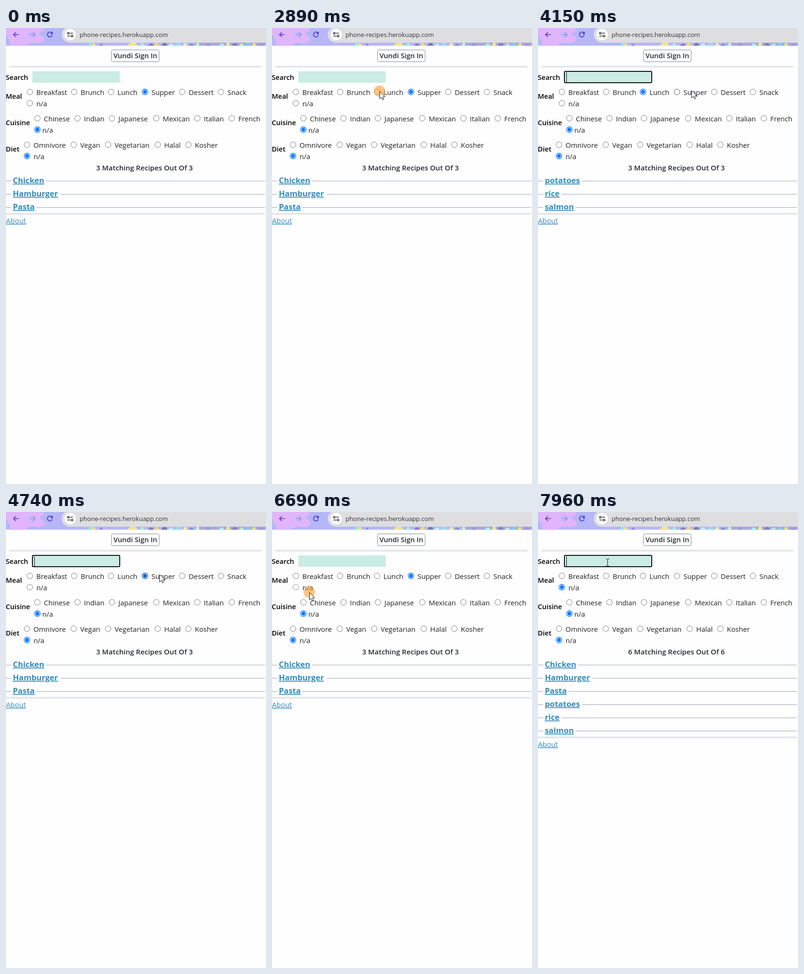
These frames come from a looping animation (551x967 px, 8000 ms). An HTML page:

```html
<!DOCTYPE html>
<html lang="en">
<head>
<meta charset="utf-8">
<title>Recipes</title>
<style>
  html, body { margin: 0; width: 100%; height: 100%; overflow: hidden; background: #fefefe; }
  svg { display: block; width: 551px; height: 967px; font-family: "Open Sans", "Noto Sans", sans-serif; }
</style>
</head>
<body>
<svg viewBox="0 0 551 967"><g id="page"></g><g id="live"></g></svg>
<script>
const LOOP = 8000;
const BLINK = 530;
const INK = '#202124', LINK = '#318bbf', RULE = '#e5e7eb', BLUE = '#0075ff';

const text = (x, y, str, size = 14.8, fill = INK, extra = '') =>
  `<text x="${x}" y="${y}" font-size="${size}" fill="${fill}" ${extra}>${str}</text>`;
const rect = (x, y, w, h, fill, extra = '') =>
  `<rect x="${x}" y="${y}" width="${w}" height="${h}" fill="${fill}" ${extra}/>`;
const path = (d, fill, extra = '') => `<path d="${d}" fill="${fill}" ${extra}/>`;
const circle = (x, y, r, fill, extra = '') => `<circle cx="${x}" cy="${y}" r="${r}" fill="${fill}" ${extra}/>`;
const SEMI = 'font-weight="600"';
const MIDDLE = SEMI + ' text-anchor="middle"';

// Each row: label, y, radio centres, names, then the wrapped n/a radio and its text x
const rows = [
  { label: 'Meal', y: 135.5, at: [50.5, 144.5, 222.5, 294.5, 373.5, 455.5],
    names: ['Breakfast', 'Brunch', 'Lunch', 'Supper', 'Dessert', 'Snack'], naText: 64.5 },
  { label: 'Cuisine', y: 191.5, at: [66.5, 151.5, 224.5, 318.5, 405.5, 478.5],
    names: ['Chinese', 'Indian', 'Japanese', 'Mexican', 'Italian', 'French'], naText: 77 },
  { label: 'Diet', y: 247.5, at: [44.5, 143.5, 216.5, 321.5, 386.5],
    names: ['Omnivore', 'Vegan', 'Vegetarian', 'Halal', 'Kosher'], naText: 58.5 },
];

function radio(x, y, on, state) {
  const ring = on ? (state === 'hover' ? '#005cc8' : BLUE)
    : state === 'hover' ? '#4f4f4f' : state === 'press' ? '#8d8d8d' : '#767676';
  return circle(x, y, 6, '#fff', `stroke="${ring}" stroke-width="${on ? 1.3 : 1}"`) +
    (on ? circle(x, y, 3.9, ring) : '');
}

const radioSpot = (row, i) => i < row.at.length ? [row.at[i], row.y] : [row.at[0], row.y + 24];

function browserBar() {
  const confetti = [
    [174, 10, '#8fe9f2'], [182, 8, '#f3e37c'], [198, 7, '#9d86e8'], [257, 22, '#f2e58f'], [284, 9, '#a7f0d6'],
    [301, 12, '#8a79c8'], [314, 10, '#f0d873'], [329, 13, '#777aa6'], [344, 11, '#b9f5ee'], [358, 14, '#9fd8f7'],
    [375, 9, '#f4ef9c'], [386, 12, '#8d8fe0'], [402, 8, '#c3f7c4'], [423, 10, '#9b9bd0'], [451, 12, '#a5f3ee'],
    [466, 9, '#f5ea92'], [478, 13, '#8780c4'], [494, 10, '#b5f4cf'], [507, 12, '#88c9f0'], [521, 9, '#f1e37d'],
    [533, 14, '#a493e6'],
  ];
  return rect(0, 0, 551, 37.5, '#b5b7f6') +
    path('M0 0H80V7Q69 7 73 15Q86 20 80 28Q70 34 60 31Q48 29 44 35L41 37.5H8Q11 27 4 22L0 13Z', '#e1b5fb') +
    path('M46 10Q55 3 62 11Q67 18 56 21Q46 20 46 10Z', '#c9bafb') +
    rect(400, 29, 151, 8.5, '#a8abd9') +
    confetti.map(([x, w, c], i) => path(`M${x} 37.5L${x + w * .3} ${31 + i % 3}H${x + w * .8}L${x + w} 37.5Z`, c)).join('') +
    path('M135 -3H551V31H135A17 17 0 0 1 135 -3Z', '#dedee1') +
    circle(136, 14, 12, '#fff') +
    path('M27 14H16M21 9L16 14L21 19', 'none', 'stroke="#4b36c4" stroke-width="1.7"') +
    path('M51 14H62M57 9L62 14L57 19', 'none', 'stroke="#9c8be6" stroke-width="1.7"') +
    path('M97.5 11A5.2 5.2 0 1 0 98 15.5M98.3 8V12.3H94', 'none', 'stroke="#4b36c4" stroke-width="1.7"') +
    path('M135.5 11H142M130 17H136.5', 'none', 'stroke="#303134" stroke-width="1.6"') +
    circle(132, 11, 1.8, 'none', 'stroke="#303134" stroke-width="1.5"') +
    circle(140, 17, 1.8, 'none', 'stroke="#303134" stroke-width="1.5"') +
    text(156, 19, 'phone-recipes.herokuapp.com', 13.1, '#303134');
}

function form() {
  let out = rect(223.5, 46.5, 101, 25, '#fff', 'rx="3" stroke="#808691"') +
    text(274, 64, 'Vundi Sign In', 14.8, '#23272f', MIDDLE) +
    rect(7, 80, 534, 4, RULE) +
    text(-.5, 110, 'Search', 14.6, '#000', SEMI) +
    rect(56, 92, 185, 24, '#caece2');
  rows.forEach((row, r) => {
    out += text(-.5, row.y + 14.5, row.label, 14.6, '#000', SEMI);
    row.names.forEach((name, i) => out += text(row.at[i] + 13.8, row.y + 6, name));
    out += text(row.naText, row.y + 30, 'n/a');
    if (r) for (let i = 0; i <= row.at.length; i++) out += radio(...radioSpot(row, i), i === row.at.length);
  });
  return out;
}

// Recipe name and where the rule resumes after it
const supper = [['Chicken', 85], ['Hamburger', 116], ['Pasta', 64]];
const lunch = [['potatoes', 93], ['rice', 50], ['salmon', 80]];

function results(list) {
  const n = list.length, end = 308 + 28 * n;
  return text(293.5, 302, `${n} Matching Recipes Out Of ${n}`, 15.1, '#23272f', MIDDLE) +
    list.map(([name, x], i) => {
      const y = 324 + 28 * i;
      return rect(0, y, 11, 1, '#9ca3af') + rect(x, y, 549 - x, 1, '#9ca3af') +
        text(14.5, y + 5, name, 16.8, LINK, 'font-weight="700" text-decoration="underline"');
    }).join('') +
    rect(0, end, 549, 4, RULE) +
    text(0, end + 22, 'About', 15, LINK, 'text-decoration="underline"');
}

// Pointer moves: start, end, number of jumps, and points as [share of move, x, y]
const moves = [
  [1060, 1200, 3, [[0, 476, 967], [1, 512, 953]]],
  [1660, 2430, 12, [[0, 512, 953], [.17, 503, 770], [.417, 445, 317], [.67, 265, 165], [.83, 216, 129], [1, 228, 134]]],
  [3940, 4150, 4, [[0, 228, 134], [1, 325, 132]]],
  [5070, 5830, 11, [[0, 325, 132], [.2, 285, 138], [.6, 145, 160], [1, 88, 171]]],
  [5960, 6230, 4, [[0, 88, 171], [1, 79, 170]]],
  [6820, 7020, 3, [[0, 79, 170], [1, 79, 162]]],
  [7280, 7960, 9, [[0, 79, 162], [.25, 92, 150], [.7, 136, 115], [1, 147, 107]]],
];

function pointerAt(t) {
  const move = moves.filter(m => t >= m[0]).pop();
  if (!move) return null;
  const [start, end, jumps, points] = move;
  const u = Math.min(1, (Math.floor((t - start) / (end - start) * (jumps - 1) + .001) + 1) / jumps);
  const i = Math.max(1, points.findIndex(p => u <= p[0]));
  const [a, b] = [points[i - 1], points[i]];
  const k = (u - a[0]) / (b[0] - a[0]);
  return [1, 2].map(j => Math.round(a[j] + (b[j] - a[j]) * k));
}

function pointer([x, y]) {
  const inField = x > 56 && x < 241 && y > 92 && y < 116;
  const d = inField
    ? 'M-3 -7.5H-1L.5 -6.5L2 -7.5H4M.5 -6.5V6.5M-3 7.5H-1L.5 6.5L2 7.5H4'
    : 'M.5 .5V16.5L4.2 13L6.6 18.5L9 17.4L6.7 12H11.4Z';
  return `<g transform="translate(${x} ${y})">` +
    path(d, inField ? 'none' : '#fff', 'stroke="#15152a"') + '</g>';
}

function hoveredMeal(p) {
  if (!p) return -1;
  const [x, y] = p, meal = rows[0];
  if (y > 149 && y < 173 && x > 43 && x < 90) return 6;
  return y > 125 && y < 149 ? meal.at.filter(cx => x >= cx - 7).length - 1 : -1;
}

const within = (t, spans) => spans.find(([a, b]) => t >= a && t < b);
const clicks = [[2890, 3020], [4410, 4540], [6690, 6820]];
const focused = [[3020, 4410], [4540, 6690], [6820, LOOP]];

function live(t) {
  const chosen = t < 3020 ? 3 : t < 4540 ? 2 : t < 6820 ? 3 : 6;
  const list = t >= 7020 ? [...supper, ...lunch] : t >= 3280 && t < 4740 ? lunch : supper;
  const p = pointerAt(t), over = hoveredMeal(p);
  const click = within(t, clicks), focus = within(t, focused);
  let out = results(list);
  for (let i = 0; i < 7; i++)
    out += radio(...radioSpot(rows[0], i), i === chosen, i === over ? (click ? 'press' : 'hover') : '');
  if (focus) {
    out += rect(56, 92, 185, 24, 'none', 'rx="2" stroke="#101010" stroke-width="2"');
    if (Math.floor((t - focus[0]) / BLINK) % 2 === 0) out += rect(60, 94, 1, 21, '#000');
  }
  if (click) out += circle(p[0], p[1], 12, '#fb9a22', 'opacity=".58"');
  return out + (p ? pointer(p) : '');
}

document.getElementById('page').innerHTML = browserBar() + form();
const layer = document.getElementById('live');
const began = performance.now();
function draw() {
  layer.innerHTML = live((performance.now() - began) % LOOP);
  requestAnimationFrame(draw);
}
draw();
</script>
</body>
</html>
```
